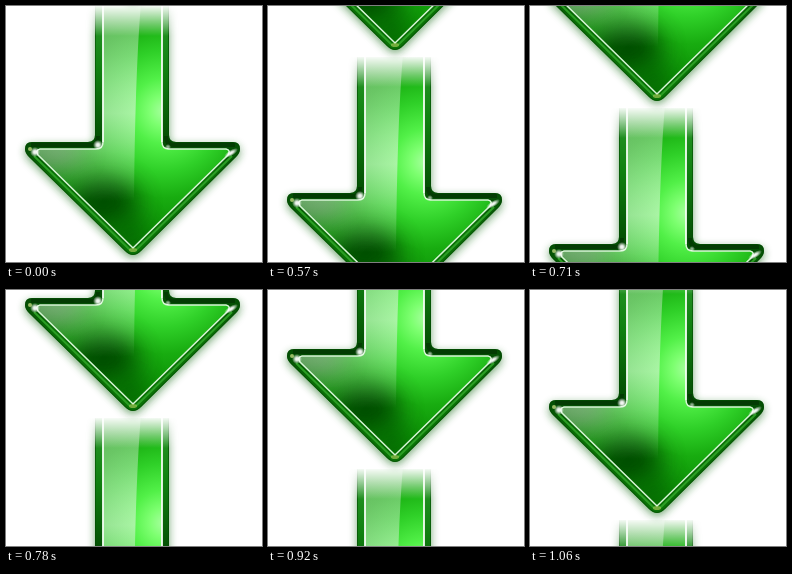
Recreate the animation shown at these times as an HTML page. Size 256x256 px, loop 1.13 s.

```html
<!DOCTYPE html>
<html>
<head>
<meta charset="utf-8">
<style>
  html, body { margin: 0; width: 100%; height: 100%; overflow: hidden; background: #fff; }
  svg { display: block; width: 256px; height: 256px; }
</style>
</head>
<body>
<svg viewBox="0 0 256 256">
  <defs>
    <linearGradient id="rim" x1="0" y1="0" x2="0" y2="256" gradientUnits="userSpaceOnUse">
      <stop offset="0" stop-color="#2a9a2a"/>
      <stop offset=".25" stop-color="#108010"/>
      <stop offset=".5" stop-color="#045204"/>
      <stop offset=".56" stop-color="#045004"/>
      <stop offset=".66" stop-color="#0a6e06"/>
      <stop offset="1" stop-color="#0a7206"/>
    </linearGradient>
    <radialGradient id="face" cx="158" cy="105" r="150" gradientUnits="userSpaceOnUse">
      <stop offset="0" stop-color="#a8ffa0"/>
      <stop offset=".1" stop-color="#7dff70"/>
      <stop offset=".22" stop-color="#52f048"/>
      <stop offset=".4" stop-color="#2fd028"/>
      <stop offset=".58" stop-color="#18ac10"/>
      <stop offset=".8" stop-color="#0c9006"/>
      <stop offset="1" stop-color="#087004"/>
    </radialGradient>
    <linearGradient id="gloss" x1="0" y1="0" x2="0" y2="195" gradientUnits="userSpaceOnUse">
      <stop offset="0" stop-color="#e4eee4" stop-opacity=".36"/>
      <stop offset=".25" stop-color="#e4eee4" stop-opacity=".42"/>
      <stop offset=".55" stop-color="#eef4ee" stop-opacity=".54"/>
      <stop offset=".7" stop-color="#e4eee4" stop-opacity=".4"/>
      <stop offset="1" stop-color="#e4eee4" stop-opacity="0"/>
    </linearGradient>
    <linearGradient id="fade" x1="0" y1="0" x2="0" y2="30" gradientUnits="userSpaceOnUse">
      <stop offset="0" stop-color="#fff" stop-opacity=".05"/>
      <stop offset="1" stop-color="#fff"/>
    </linearGradient>
    <radialGradient id="spark">
      <stop offset="0" stop-color="#fff"/>
      <stop offset=".35" stop-color="#fff" stop-opacity=".85"/>
      <stop offset="1" stop-color="#fff" stop-opacity="0"/>
    </radialGradient>
    <filter id="blur" x="-20%" y="-20%" width="140%" height="140%"><feGaussianBlur stdDeviation="4"/></filter>
    <filter id="soft" x="-80%" y="-80%" width="260%" height="260%"><feGaussianBlur stdDeviation="12"/></filter>
    <mask id="fadeMask" maskUnits="userSpaceOnUse" x="0" y="0" width="256" height="270">
      <rect width="256" height="270" fill="url(#fade)"/>
    </mask>
    <path id="outer" d="M89-4V129Q89 136 82 136H26Q19 136 19 143Q19 147 23 151L119 245Q127 253 135 245L230 151Q234 147 234 143Q234 136 227 136H170Q163 136 163 129V-4Z"/>
    <path id="inner" d="M97-4V136Q97 143 90 143H34Q29 144 32 149L127 242L222 149Q225 144 220 143H163Q156 143 156 136V-4Z"/>
    <clipPath id="outerClip"><use href="#outer"/></clipPath>
    <clipPath id="innerClip"><use href="#inner"/></clipPath>

    <g id="arrow" mask="url(#fadeMask)">
      <use href="#outer" y="3" fill="#1c6e1c" opacity=".6" filter="url(#blur)"/>
      <use href="#outer" fill="url(#rim)"/>
      <g clip-path="url(#outerClip)" fill="none">
        <use href="#outer" stroke="#034803" stroke-width="2" opacity=".6"/>
        <path d="M25 139H86Q92 139 92 130M160 130Q160 139 168 139H229" stroke="#033c03" stroke-width="4"/>
        <path d="M28 150L124 244M130 244L226 150" stroke="#2b9f24" stroke-width="2"/>
      </g>
      <g clip-path="url(#innerClip)">
        <rect y="-4" width="256" height="260" fill="url(#face)"/>
        <ellipse cx="98" cy="196" rx="34" ry="24" fill="#004a00" opacity=".95" filter="url(#soft)"/>
        <ellipse cx="124" cy="226" rx="14" ry="18" fill="#005400" opacity=".6" filter="url(#soft)"/>
        <ellipse cx="50" cy="148" rx="28" ry="10" fill="#707c70" opacity=".7" filter="url(#soft)"/>
        <path d="M135-4Q129 70 128 195H20V-4Z" fill="url(#gloss)"/>
      </g>
      <use href="#inner" fill="none" stroke="#d8f6d6" stroke-width="1.5"/>
      <path d="M97 0V136M156 0V136" stroke="#fff" stroke-width="1.6" opacity=".8"/>
      <circle cx="29" cy="146" r="5" fill="url(#spark)"/>
      <circle cx="24" cy="143" r="2" fill="#d8e890" opacity=".7"/>
      <ellipse cx="225" cy="147" rx="8" ry="3" fill="url(#spark)" transform="rotate(-32 225 147)"/>
      <circle cx="92" cy="139" r="5" fill="url(#spark)"/>
      <circle cx="162" cy="141" r="3" fill="url(#spark)" opacity=".6"/>
      <ellipse cx="127" cy="244" rx="4" ry="2" fill="#b9d463" opacity=".6"/>
    </g>
  </defs>
  <g id="strip">
    <use href="#arrow"/>
    <use href="#arrow" y="-256"/>
  </g>
</svg>
<script>
  const SIZE = 256, HOLD = 500, STEP = 70, STEPS = 10;
  const LOOP = HOLD + STEP * (STEPS - 1);
  const strip = document.getElementById('strip');

  // Rest, then drop one tenth of the stage per step.
  function draw(now) {
    const t = now % LOOP;
    const step = t < HOLD ? 0 : 1 + Math.floor((t - HOLD) / STEP);
    strip.setAttribute('transform', `translate(0 ${Math.round(step * SIZE / STEPS)})`);
    requestAnimationFrame(draw);
  }
  draw(0);
</script>
</body>
</html>
```
